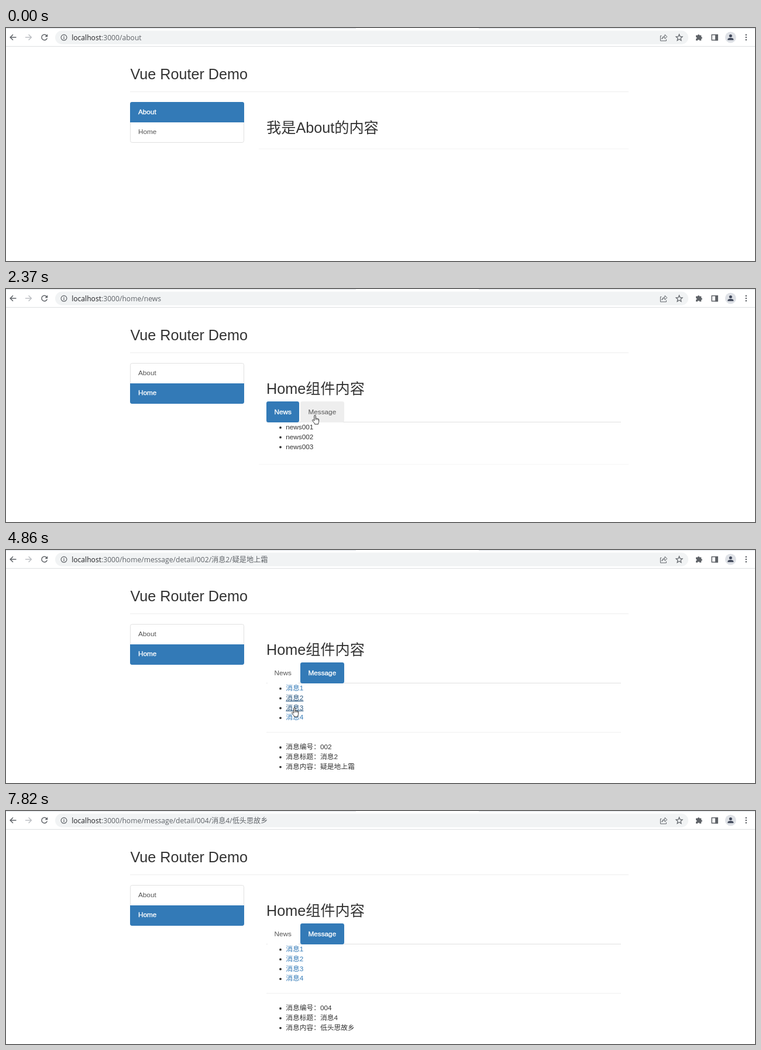
Write an HTML page that moves like this. It is 1280 by 400 pixels and loops after 7.89 s.

```html
<!DOCTYPE html>
<html lang="zh-CN">
<head>
<meta charset="utf-8">
<title>Vue Router Demo</title>
<style>
html, body { margin: 0; width: 100%; height: 100%; overflow: hidden; background: #fff; }
svg { display: block; width: 1280px; height: 400px; }
text { font: 11.76px "Liberation Sans", Arial, "Noto Sans CJK SC", "Noto Sans CJK", sans-serif; fill: #333; }
.h2 { font-size: 25.2px; }
.url { font: 12.13px "Open Sans", "Noto Sans CJK SC", "Noto Sans CJK", sans-serif; fill: #5f6368; }
.host { fill: #202124; }
.item { fill: #555; }
.on { fill: #fff; stroke: #fff; stroke-width: .35px; }
.link { fill: #337ab7; }
.lit { fill: #23527c; text-decoration: underline; }
.icon { fill: none; stroke: #5f6368; stroke-width: 1.5; }
.solid { fill: #5f6368; stroke: none; }
.person { fill: #40485a; stroke: none; }
</style>
</head>
<body>
<svg viewBox="0 0 1280 400">
  <defs><clipPath id="side"><rect x="212" y="127" width="195" height="70" rx="3.4"/></clipPath></defs>

  <!-- browser bar -->
  <path d="M0 .5H598M808 .5H1280" stroke="#dee1e6"/>
  <path d="M0 31.6H1280" stroke="#dcdee1"/>
  <rect x="84" y="4.5" width="1082" height="23.5" rx="11.75" fill="#f1f3f4"/>
  <g class="icon">
    <path id="back" d="M17.5 16H7.5M12 11.2L7.2 16L12 20.8"/>
    <path d="M33 16H43.2M38.6 11.2L43.4 16L38.6 20.8" stroke="#bcbfc3"/>
    <path d="M69.6 13.2A4.8 4.8 0 1 0 70.3 17.4"/>
    <path class="solid" d="M71.2 10.4V15.2H66.4z"/>
    <circle cx="99" cy="16.3" r="4.9" stroke-width="1.2"/>
    <path d="M99 15.6V19M99 13.4V14.7" stroke-width="1.3"/>
    <path d="M1120.4 13.4H1118.4V22H1128.4V19.4M1120.8 19C1121.2 15.6 1123 14.2 1126 14.1V11.4L1129.8 15L1126 18.4V16C1123.6 16 1122 17 1120.8 19z" stroke-width="1"/>
    <path d="M1150.5 10.9L1152 14.6L1156 14.9L1153 17.5L1153.9 21.4L1150.5 19.3L1147.1 21.4L1148 17.5L1145 14.9L1149 14.6z" stroke-width="1.2"/>
    <path class="solid" d="M1179 12.6H1182A1.6 1.6 0 0 1 1185.2 12.6H1188.2V15.3A1.6 1.6 0 0 1 1188.2 18.6V21.6H1185.2A1.5 1.5 0 0 0 1182 21.6H1179V18.6A1.5 1.5 0 0 0 1179 15.5z"/>
    <rect x="1206.2" y="11.6" width="9.8" height="9.2"/>
    <path class="solid" d="M1212 11H1216.7V21.5H1212z"/>
    <circle cx="1238.3" cy="16" r="9.4" fill="#dee1e6" stroke="none"/>
    <circle class="person" cx="1238.3" cy="13.5" r="2.5"/>
    <path class="person" d="M1233.3 20.8V19.6C1233.3 17.8 1236 17.1 1238.3 17.1S1243.3 17.8 1243.3 19.6V20.8z"/>
    <path d="M1264.8 11.8v0m0 4.2v0m0 4.2v0" stroke-width="2.6" stroke-linecap="round"/>
  </g>
  <text class="url" x="112.2" y="20.6"><tspan class="host">localhost</tspan><tspan id="path"></tspan></text>

  <!-- page -->
  <text class="h2" x="212.4" y="88">Vue Router Demo</text>
  <path d="M212 109.5H1064" stroke="#eee"/>
  <g id="view"></g>
  <g id="hand" stroke="#222">
    <path d="M3.8 10.2V1.8a1.2 1.2 0 0 1 2.4 0V6.5a1.05 1.05 0 0 1 2 .2a1.05 1.05 0 0 1 1.9.5a.9.9 0 0 1 1.5.8V11.5c0 1.7-1 2.5-1 4.6H4.6C4.5 14 .6 10.9.5 9.4c0-1 1.3-1.3 2-.4z" fill="#fff" stroke-width=".95" stroke-linejoin="round"/>
    <path d="M6.2 6.5V9M8.2 6.9V9M10.1 7.4V9.2" stroke-width=".7"/>
  </g>
  <path id="arrow" d="M.6 .8V14L3.6 11.2L5.6 16L7.7 15.1L5.7 10.5H9.9z" fill="#fff" stroke="#222" stroke-width=".9"/>
</svg>
<script>
const LOOP = 7890, ROW = 16.8, TICK = 65;
const BLUE = '#337ab7', BORDER = '#e0e0e0', FAINT = '#f4f4f4';
const LINES = ['窗前明月光', '疑是地上霜', '举头望明月', '低头思故乡'];
const PATHS = { about: 'about', home: 'home', news: 'home/news', message: 'home/message' };

// clicks: when each page opens, and when each message link is pressed
const PAGES = { about: 0, home: 1030, news: 1960, message: 2650 };
const PRESS = [3400, 4400, 5190, 6210], OPEN_DELAY = 100, BLUR = 7820;

// pointer moves: from, until, then the place it reaches
const ENTER = 260, LEAVE = 7150, ENTRY = [1227, 384];
const MOVES = [
  [260, 750, 236, 171], [820, 890, 313, 180], [1360, 1420, 424, 211],
  [1680, 1680, 448, 214], [1750, 1890, 465, 206], [2230, 2370, 523, 216],
  [2440, 2580, 532, 212], [2720, 3200, 476, 232], [4000, 4200, 488, 252],
  [4730, 4860, 488, 270], [5800, 6010, 494, 290], [7020, 7090, 702, 369]
];

const $ = id => document.getElementById(id);
const inside = (v, a, b) => v >= a && v <= b;
const ease = p => p * p * (3 - 2 * p);
const pressed = t => PRESS.filter(time => time <= t).length;

function pointer(t) {
  let [x, y] = ENTRY;
  for (const [from, until, toX, toY] of MOVES) {
    if (t < from) break;
    const steps = Math.round((until - from) / TICK) + 1;
    const p = t >= until ? 1 : ease((Math.floor((t - from) / TICK) + 1) / steps);
    x += (toX - x) * p;
    y += (toY - y) * p;
  }
  return [x, y];
}

const label = (x, y, str, cls = '') => `<text x="${x}" y="${y}" class="${cls}">${str}</text>`;
const rule = (x1, x2, y, color) => `<path d="M${x1} ${y}H${x2}" stroke="${color}"/>`;
const panelEnd = y => rule(432, 1064, y, FAINT);
const bullets = (top, items, cls = () => '') => items.map((str, i) => {
  const y = top + i * ROW;
  return `<circle cx="469" cy="${y - 3.1}" r="1.9" fill="#333"/>` + label(478.3, y, str, cls(i + 1));
}).join('');

function sidebar(page, homeHover) {
  const about = page === 'about';
  const row = (y, fill) => `<rect x="212" y="${y}" width="195" height="35" fill="${fill}" clip-path="url(#side)"/>`;
  return (homeHover && about ? row(162, '#f5f5f5') : '')
    + `<rect x="212.5" y="127.5" width="194" height="69" rx="3" fill="none" stroke="${BORDER}"/>`
    + row(about ? 127 : 162, BLUE)
    + label(226, 148.2, 'About', about ? 'on' : 'item')
    + label(226, 182.2, 'Home', about ? 'item' : 'on');
}

function tab(x, w, str, active, hover) {
  const fill = active ? BLUE : hover ? '#eee' : '#fff';
  return `<rect x="${x}" y="193" width="${w}" height="36" rx="3.4" fill="${fill}"/>`
    + label(x + 13.5, 214.7, str, active ? 'on' : 'item');
}

function content(page, tabHover, link, focus, detail) {
  if (page === 'about') return label(445, 180, '我是About的内容', 'h2') + panelEnd(207.5);
  const head = label(445, 180, 'Home组件内容', 'h2') + rule(445, 1051, 228.5, BORDER)
    + tab(445, 56, 'News', page === 'news', tabHover === 1)
    + tab(503, 75, 'Message', page === 'message', tabHover === 2);
  if (page === 'home') return head + panelEnd(242.5);
  if (page === 'news') return head + bullets(241, ['news001', 'news002', 'news003']) + panelEnd(301);
  const links = bullets(241, [1, 2, 3, 4].map(n => '消息' + n),
    n => n === link || n === focus ? 'lit' : 'link') + rule(445, 1051, 313, '#eee');
  if (!detail) return head + links + panelEnd(343);
  return head + links + bullets(342.1, [
    '消息编号：00' + detail, '消息标题：消息' + detail, '消息内容：' + LINES[detail - 1]
  ]);
}

const address = (page, n) => ':3000/' + PATHS[page]
  + (n ? `/detail/00${n}/消息${n}/${LINES[n - 1]}` : '');

let last = '';
function draw(t) {
  const page = Object.keys(PAGES).findLast(name => PAGES[name] <= t);
  const detail = pressed(t - OPEN_DELAY), focus = t < BLUR ? pressed(t) : 0;
  const shown = inside(t, ENTER, LEAVE - 1);
  const [left, top] = pointer(t), x = left + 4;

  const onSide = inside(x, 212, 407) && inside(top, 127, 197);
  const onTabs = page !== 'about' && inside(x, 445, 578) && inside(top, 193, 228.6);
  const tabHover = !onTabs ? 0 : inside(x, 454, 501) ? 1 : x >= 503 ? 2 : 0;
  const row = Math.floor((top - 228.6) / ROW) + 1;
  const link = page === 'message' && shown && inside(x, 478, 509) && inside(row, 1, 4) ? row : 0;
  const hand = onSide || onTabs || link > 0;

  for (const [id, used] of [['hand', hand], ['arrow', !hand]]) {
    $(id).style.display = shown && used ? '' : 'none';
    $(id).setAttribute('transform', `translate(${left} ${top})`);
  }
  const homeHover = onSide && top > 162;
  const key = [page, detail, focus, homeHover, tabHover, link].join();
  if (key === last) return;
  last = key;
  $('path').textContent = address(page, detail);
  $('view').innerHTML = sidebar(page, homeHover) + content(page, tabHover, link, focus, detail);
}

const start = performance.now();
function tick() {
  draw((performance.now() - start) % LOOP);
  requestAnimationFrame(tick);
}
tick();
</script>
</body>
</html>
```
